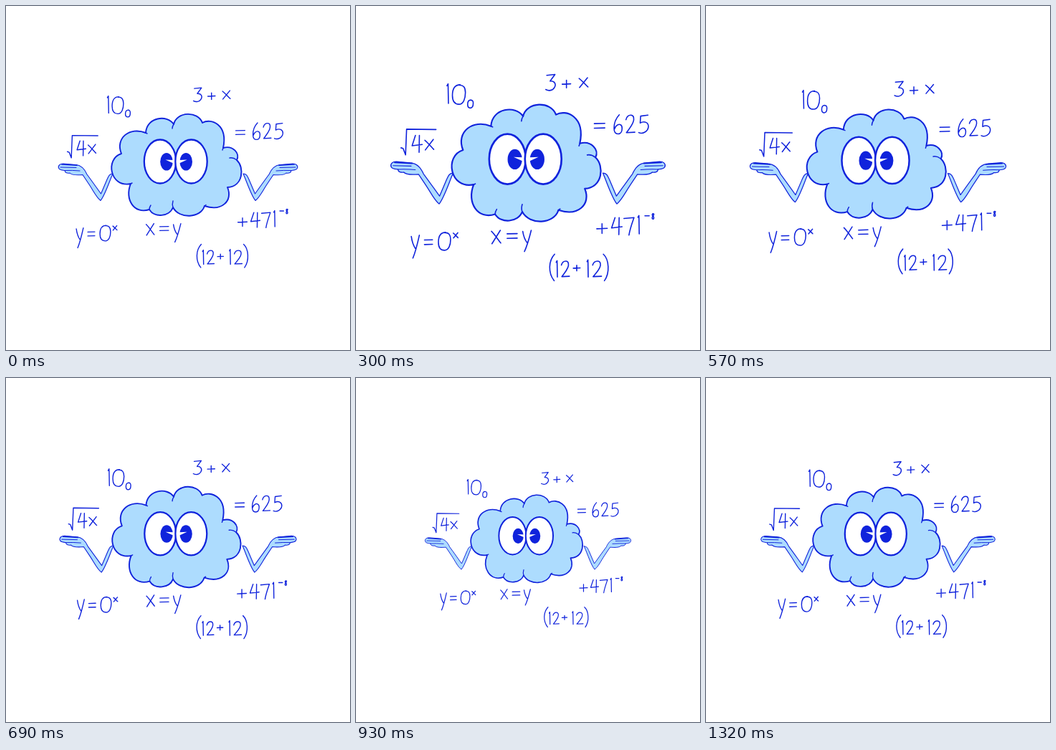
An HTML page with a canvas that plays this animation: 480 by 480 pixels, repeating every 1.35 s.

```html
<!DOCTYPE html>
<html lang="en">
<head>
<meta charset="utf-8">
<title>Puzzled cloud</title>
<style>
  html, body { margin: 0; width: 100%; height: 100%; overflow: hidden; background: #fff; }
  canvas { display: block; width: 480px; height: 480px; }
</style>
</head>
<body>
<canvas id="stage" width="480" height="480" role="img"
  aria-label="10₀, 3 + x, = 625, √4x, y = 0ˣ, x = y, (12 + 12), +471⁻⁸"></canvas>
<script>
const ctx = document.getElementById('stage').getContext('2d');
const INK = '#1023dc', SKY = '#addcfe';
const LOOP = 1350, STEP = 30, CENTER = 240, SWELL = 0.15;

// Handwritten strokes, each in a box 10 wide and 20 high
const GLYPHS = {
  '0': 'M6 0C1 0 0 6 0 11C0 17 2 20 5 20C8.500 20 10 14 10 8C10 3 8.500 0 5.200 .5',
  '1': 'M3.200 2L4.800 0L5.300 20',
  '2': 'M0 5C1 1 3.500 0 5.500 0C9 0 9.500 4 8 8C6 13 3 16 .5 19.500L10 19',
  '3': 'M1 1.500L9.500 .5L4.500 8.500C9 8 11 12 9 16C7 20 3 20.500 0 18.500',
  '4': 'M3.300 1L0 12.500L10 11.200M7.200 1L6.900 20',
  '5': 'M9.500 0L2 1L1.500 8.500C6 6 10 8 10 12.500C9.500 18 4 21 0 19',
  '6': 'M6.500 0C2 4 0 10 0 14C0 18 2 20 5 20C8.500 20 10 17 10 14C10 10 6 9 3 11.500C1.500 12.500 1 14 .5 15',
  '7': 'M0 1.500L10 .5C8 7 6 13 5 20',
  '8': 'M9 2C4 -2 0 4 4 8C10 11 10 20 5 20C0 19 2 11 6 9C9 6 9 4 7 2',
  'x': 'M0 1.500C4 7 7 14 10 19M9.500 0L.5 20',
  'y': 'M0 1C1 6 2.500 9 5 11.500M10 0C7.500 8 5 15 2 20',
  '+': 'M0 10.500L10 9.500M5 0L5 20',
  '=': 'M0 1L10 0M0 20L10 19',
  '-': 'M0 10L10 10',
  '(': 'M10 0C-2 5 -3 14 9 20',
  ')': 'M0 0C11 4 13 14 2 20',
  '√': 'M0 14.500L1.200 15L2.600 20L3.200 0L20 .3'
};

const writing = new Path2D();
const INSET = 0.6; // keeps the stroke inside its box
function write(char, x, y, w, h) {
  writing.addPath(new Path2D(GLYPHS[char]), new DOMMatrix([
    (w - 2 * INSET) / 10, 0, 0, (h - 2 * INSET) / 20, x + INSET, y + INSET
  ]));
}

write('1', 138, 125, 10, 25);
write('0', 147.5, 126, 17, 25);
write('0', 166, 144.5, 8, 11);

write('3', 261, 113, 13, 21.5);
write('+', 281, 120.5, 11.5, 10.5);
write('x', 301.5, 117.5, 12, 13);

write('=', 320, 173, 14, 7);
write('6', 344, 162.5, 11, 24.5);
write('2', 358.5, 163, 12, 23);
write('5', 374, 163, 13, 23.5);

write('√', 85, 180, 22.5, 32.5);
write('4', 98.5, 186.5, 13.5, 23);
write('x', 114, 192.5, 12, 14);

write('y', 97.5, 309, 11, 29);
write('=', 113.5, 314.5, 11, 7);
write('0', 130.5, 305.5, 16, 23);
write('x', 148.5, 306, 7, 7.5);

write('x', 195, 303, 12.5, 17.5);
write('=', 214, 307, 13.5, 7);
write('y', 233, 303, 11.5, 27);

write('(', 265.5, 332, 7.5, 33.5);
write('1', 271.5, 340, 8, 21);
write('2', 280, 340.5, 11, 20.5);
write('+', 294.5, 345.5, 9.5, 8);
write('1', 309, 339, 8, 22);
write('2', 318, 340.5, 12, 20.5);
write(')', 331, 332, 7.5, 33.5);

write('+', 323, 295, 14, 13);
write('4', 341, 286.5, 14, 23);
write('7', 356, 287, 13.5, 23);
write('1', 370.5, 285, 9, 23.5);
write('-', 381.5, 284, 6.5, 4);
write('8', 389.7, 282.5, 4.3, 8);

const body = new Path2D(`M234 165 C238 147 268 146 274 163
  C286 156 310 165 303 198 C317 194 327 206 322 215
  C333 225 331 252 309 253 C317 272 301 287 277 279
  C272 296 242 298 233 281 C228 294 207 296 200 284
  C179 291 165 270 174 248 C145 254 138 213 161 206
  C152 184 173 168 195 177 C196 155 225 151 234 165Z`);
const creases = new Path2D(`M234 165 Q232 168 232 171 M303 198 L302 201
  M322 215 Q317 211 312 212 M277 279 L279 277.500 M233 281 Q231.500 277 233 272
  M200 284 Q200 281 202 278 M174 248 L176 247 M195 177 L197 178`);

const arm = new Path2D(`M149 234 C144 234 143 238 141 242 L132.500 262
  C126 253 119 243 113 235 C110 228 105 222 97 221.500 L80 220
  C74 220 72 224 74 227 C76 229.500 80 229 82 229.500
  C82 233 86 233.500 89 233 C92 236.500 101 236 107 235.500
  L116 249 C122 258 126 267 132 271.500 C138 264 143 248 149 234Z`);
const fingers = new Path2D('M76 225 L98 225.500 M82 229.500 Q92 229 103 230');
const fingertop = new Path2D('M78 221 L99 222.200');

function outline(path, width) {
  ctx.lineWidth = width;
  ctx.stroke(path);
}

function fillShape(path, color, width) {
  ctx.fillStyle = color;
  ctx.fill(path);
  if (width) outline(path, width);
}

function ellipse(x, y, rx, ry) {
  const path = new Path2D();
  path.ellipse(x, y, rx, ry, 0, 0, Math.PI * 2);
  return path;
}

function drawArm() {
  fillShape(arm, SKY, 1.1);
  outline(fingers, 1);
  outline(fingertop, 1.7);
}

function drawMirrored(draw) {
  ctx.save();
  ctx.translate(2 * CENTER, 0);
  ctx.scale(-1, 1);
  draw();
  ctx.restore();
}

function drawEyes() {
  fillShape(ellipse(215, 217, 22.2, 30.5), '#fff', 2.3);
  fillShape(ellipse(258.5, 217, 22.2, 30.5), '#fff', 2.3);
  fillShape(ellipse(224, 217.3, 8.8, 12.3), INK);
  fillShape(ellipse(251.2, 217.3, 8.8, 12.3), INK);
  fillShape(new Path2D('M222.500 214.500L233.500 215L233.500 219.500Z'), '#fff');
  fillShape(new Path2D('M252.700 214.500L241.700 215L241.700 219.500Z'), '#fff');
}

function render(now) {
  const time = Math.floor((now % LOOP) / STEP) * STEP;
  const scale = 1 + SWELL * Math.sin(2 * Math.PI * time / LOOP);

  ctx.setTransform(1, 0, 0, 1, 0, 0);
  ctx.fillStyle = '#fff';
  ctx.fillRect(0, 0, 480, 480);
  ctx.translate(CENTER, CENTER);
  ctx.scale(scale, scale);
  ctx.translate(-CENTER, -CENTER);
  ctx.strokeStyle = INK;
  ctx.lineCap = ctx.lineJoin = 'round';

  drawArm();
  drawMirrored(drawArm);
  fillShape(body, SKY, 1.9);
  outline(creases, 1.4);
  drawEyes();
  outline(writing, 1.4);
}

const start = performance.now();
function tick() {
  render(performance.now() - start);
  requestAnimationFrame(tick);
}
tick();
</script>
</body>
</html>
```
